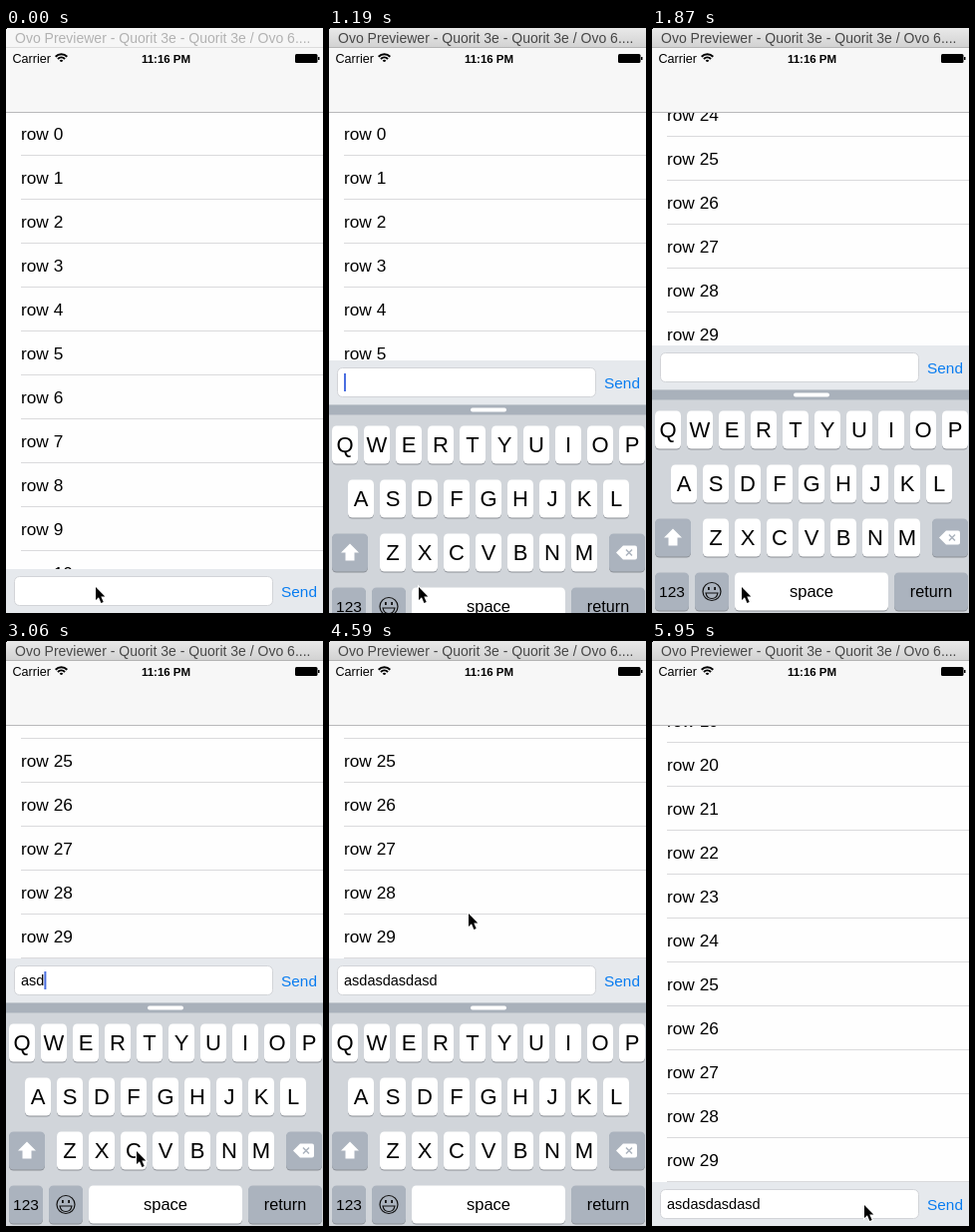
Animation of 318 by 586 pixels, one loop 6630 ms. Source, as an HTML page with a canvas:

```html
<!DOCTYPE html>
<html lang="en">
<head>
<meta charset="utf-8">
<title>Chat input</title>
<style>
  html, body { margin: 0; width: 100%; height: 100%; overflow: hidden; background: #fff; }
  canvas { display: block; }
</style>
</head>
<body>
<canvas id="stage" width="318" height="586"></canvas>
<script>
const ctx = document.getElementById('stage').getContext('2d');
const W = 318, H = 586, LOOP = 6630, STEP = 170;
const HEADER = 84, ROW = 44, ROWS = 30, BAR_DOWN = 542, TRAVEL = 224;
const MESSAGE = 'asdasdasdasd';

// Pointer: resting place, then moves [start, end, x, y]
const POINTER_START = [90, 560];
const POINTER_MOVES = [[2210, 3060, 131, 511], [3900, 4420, 140, 273], [5100, 5900, 213, 565]];

const clamp = v => Math.min(1, Math.max(0, v));
const ease = v => { v = clamp(v); return v * v * (3 - 2 * v); };
const spring = ms => {
  const k = Math.max(0, ms) * 0.0183;
  return 1 - (1 + k) * Math.exp(-k);
};

function rect(x, y, w, h, fill) {
  ctx.fillStyle = fill;
  ctx.fillRect(x, y, w, h);
}

function round(x, y, w, h, r, fill, stroke) {
  ctx.beginPath();
  ctx.roundRect(x, y, w, h, r);
  ctx.fillStyle = fill;
  ctx.fill();
  if (stroke) {
    ctx.lineWidth = 1;
    ctx.strokeStyle = stroke;
    ctx.stroke();
  }
}

function text(str, x, y, size, fill = '#000', align = 'left', weight = '') {
  ctx.font = `${weight} ${size}px "Liberation Sans", Arial, sans-serif`;
  ctx.textAlign = align;
  ctx.fillStyle = fill;
  ctx.fillText(str, x, y);
}

function shape(d, x, y, fill, stroke, width = 1) {
  const path = new Path2D(d);
  ctx.save();
  ctx.translate(x, y);
  if (stroke) {
    ctx.strokeStyle = stroke;
    ctx.lineWidth = width;
    ctx.stroke(path);
  }
  if (fill) {
    ctx.fillStyle = fill;
    ctx.fill(path);
  }
  ctx.restore();
}

function drawTitle(active) {
  const shade = ctx.createLinearGradient(0, 0, 0, 20);
  shade.addColorStop(0, active ? '#e9e9e9' : '#f6f6f6');
  shade.addColorStop(1, active ? '#d1d1d1' : '#f6f6f6');
  rect(0, 0, W, 20, shade);
  rect(0, 19, W, 1, active ? '#b4b4b4' : '#dcdcdc');
  rect(0, 0, 1, 1, '#000');
  text('Ovo Previewer - Quorit 3e - Quorit 3e / Ovo 6....', 9, 15, 14, active ? '#474747' : '#b2b2b2');
}

function drawHeader() {
  rect(0, 20, W, 64, '#f7f7f7');
  rect(0, HEADER, W, 1, '#b9b9bb');
  text('Carrier', 6.5, 34.5, 12.6);
  for (const r of [1.6, 5, 8.2]) {
    ctx.beginPath();
    ctx.arc(55.5, 34.5, r, -Math.PI * 0.75, -Math.PI * 0.25);
    ctx.lineWidth = 2;
    ctx.strokeStyle = '#000';
    ctx.stroke();
  }
  text('11:16 PM', 160.5, 34.5, 11.5, '#000', 'center', 'bold');
  round(290, 26, 22.5, 9, 1.5, '#000');
  rect(313, 29, 1.5, 3, '#000');
}

function drawRows(top, bottom) {
  for (let i = 0; i < ROWS; i++) {
    const y = top + i * ROW;
    if (y + ROW < HEADER || y > bottom) continue;
    text('row ' + i, 15, y + 27.5, 17.3);
    rect(15, y + ROW - 1, W, 1, '#dadadc');
  }
}

function drawInput(y, message, caret) {
  rect(0, y, W, 46, '#e6e9ed');
  round(8.5, y + 7.5, 259, 29, 5, '#fff', '#d2d4d8');
  text(message, 15, y + 27, 14.5);
  if (caret) rect(15 + ctx.measureText(message).width, y + 13, 2, 18, '#4a6ee0');
  text('Send', 276, y + 28, 15.4, '#087cf0');
}

function key(x, y, w, label, size = 22, fill = '#fff') {
  round(x, y + 1, w, 38, 4.5, '#8b8f96');
  round(x, y, w, 38, 4.5, fill);
  if (label) text(label, x + w / 2, y + 18.8 + size * 0.36, size, '#000', 'center');
}

function drawKeyboard(y) {
  const dark = '#abb3be';
  rect(0, y, W, H, '#d1d5da');
  rect(0, y, W, 10, '#a9b1bb');
  round(142, y + 3, 36, 4, 2, '#fff');
  ['QWERTYUIOP', 'ASDFGHJKL', 'ZXCVBNM'].forEach((letters, r) => {
    [...letters].forEach((c, i) => key([3, 19, 51][r] + i * 32, y + 21 + r * 54, 26, c));
  });
  const third = y + 129, fourth = y + 183;
  key(3, third, 36, '', 0, dark);
  shape('M0-9 L9 0 H4.5 V8 H-4.5 V0 H-9Z', 21, third + 19, '#fff');
  key(281, third, 36, '', 0, dark);
  shape('M-11 0 L-4-7 H8 Q10-7 10-5 V5 Q10 7 8 7 H-4Z', 299, third + 19, '#fff');
  shape('M-1-3 L5 3 M5-3 L-1 3', 299, third + 19, null, dark, 1.5);
  key(3, fourth, 34, '123', 15.5, dark);
  key(43, fourth, 34, '', 0, dark);
  shape('M9 0 A9 9 0 1 1-9 0 A9 9 0 1 1 9 0Z M-6 1.5 H6 Q5 7 0 7 Q-5 7-6 1.5Z', 60, fourth + 19, null, '#111', 1.2);
  shape('M-4-4.5 h1.8 v3 h-1.8Z M2.2-4.5 h1.8 v3 h-1.8Z', 60, fourth + 19, '#111');
  key(83, fourth, 154, 'space', 16.5);
  key(243, fourth, 74, 'return', 16.2, dark);
}

function drawPointer(t) {
  let [x, y] = POINTER_START;
  for (const [from, to, nx, ny] of POINTER_MOVES) {
    const p = ease((t - from) / (to - from));
    x += (nx - x) * p;
    y += (ny - y) * p;
  }
  shape('M0 0 V13 L3 10.3 L5.4 16 L7.7 15 L5.3 9.5 H9.3Z', Math.round(x), Math.round(y), '#000', '#fff', 2);
}

function draw(t) {
  const shown = spring(t - 950) - spring(t - 4805);
  const barTop = Math.round(BAR_DOWN - TRAVEL * shown);
  const scroll = ease((t - 1400) / 500) * (HEADER + ROWS * ROW - barTop);
  const typed = MESSAGE.slice(0, Math.max(0, Math.floor((t - 2700) / 110)));
  const focused = t >= 1020 && t < 4590;
  const caret = focused && (t >= 2700 || (t - 1020) % 1000 < 650);

  rect(0, 0, W, H, '#fefefe');
  drawRows(Math.round(HEADER - scroll), barTop);
  drawHeader();
  drawTitle(t >= 680);
  drawInput(barTop, typed, caret);
  drawKeyboard(barTop + 44.5);
  drawPointer(t);
}

function tick() {
  const t = performance.now() % LOOP;
  draw(Math.floor(t / STEP) * STEP);
  requestAnimationFrame(tick);
}
tick();
</script>
</body>
</html>
```
